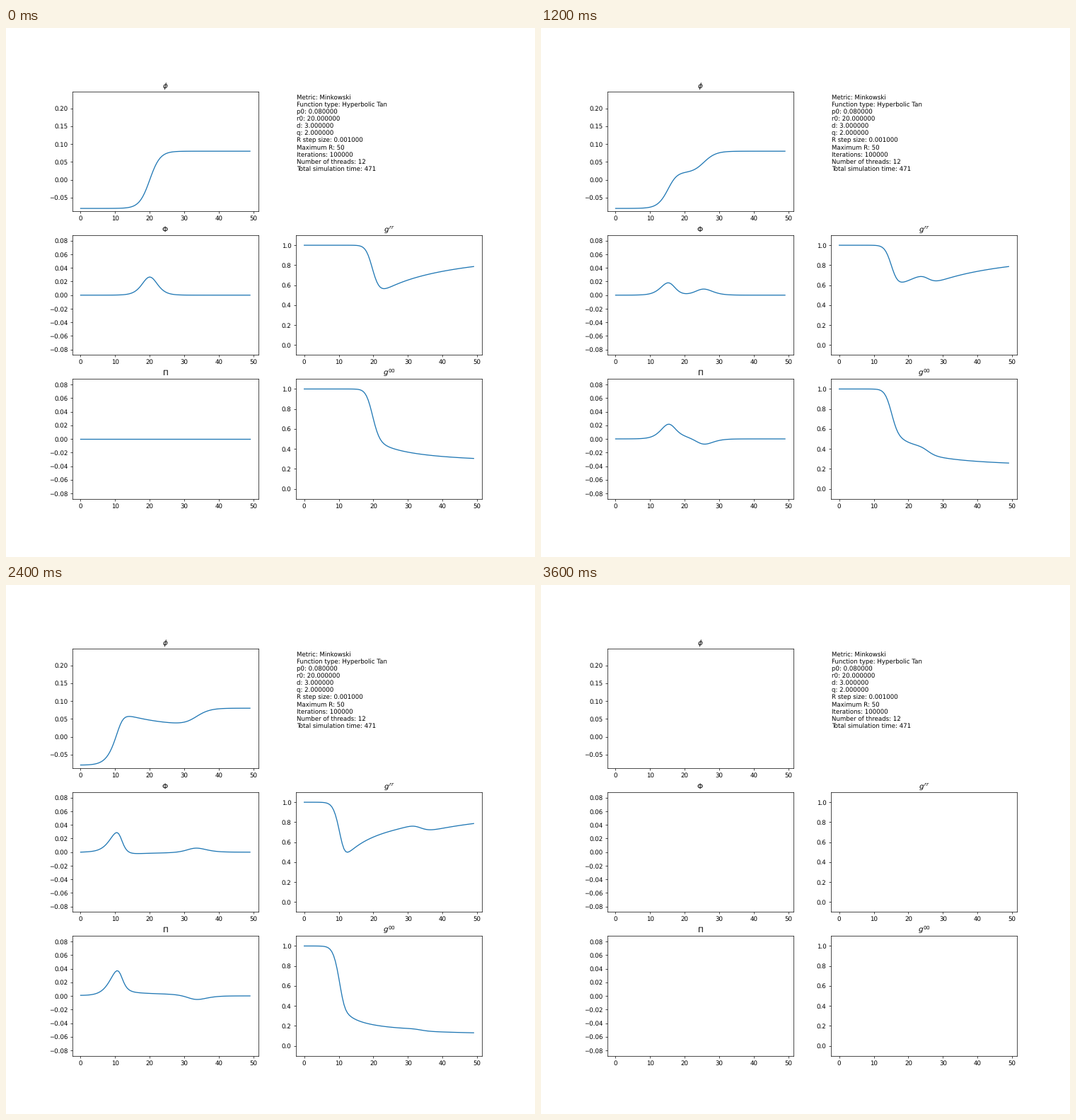
Recreate the animation shown at these times as a matplotlib script. Size 748 by 748 pixels, loop 5000 ms.

```python
import numpy as np
import matplotlib.pyplot as plt
from matplotlib.animation import FuncAnimation

# Collapse of a massless scalar field in polar-areal coordinates.
P0, R0, D = 0.08, 20.0, 3.0
DR, R_MAX = 0.025, 60.0
FRAME_TIME = 0.4        # coordinate time per frame
LIVE, FRAMES = 36, 50   # the run breaks down after LIVE frames
CFL, DAMP = 0.8, 0.08

r = np.arange(0, R_MAX + DR / 2, DR)
area = r[2:] ** 3 - r[:-2] ** 3
shown = slice(0, int(round(49 / DR)) + 1, int(round(0.5 / DR)))


def cumint(f):
    out = np.zeros_like(f)
    np.cumsum((f[1:] + f[:-1]) * (DR / 2), out=out[1:])
    return out


def metric(Phi, Pi):
    """Return 1/a^2 and the lapse, with unit lapse at the centre."""
    source = 2 * np.pi * r * (Phi ** 2 + Pi ** 2)
    factor = np.exp(cumint(2 * source))
    grr = np.ones_like(r)
    grr[1:] = (cumint(factor) / factor)[1:] / r[1:]
    slope = source.copy()
    slope[1:] += (1 / grr[1:] - 1) / (2 * r[1:])
    return grr, np.exp(cumint(slope))


def rates(state):
    phi, Phi, Pi = state
    grr, lapse = metric(Phi, Pi)
    speed = lapse * np.sqrt(grr)
    flow, flux = speed * Pi, speed * Phi
    out = np.zeros_like(state)
    out[0] = flow
    out[1, 1:-1] = (flow[2:] - flow[:-2]) / (2 * DR)
    moment = r ** 2 * flux
    out[2, 1:-1] = 3 * (moment[2:] - moment[:-2]) / area
    out[2, 0] = 3 * flux[1] / DR
    f = state[1:]
    out[1:, 2:-2] -= DAMP / (16 * DR) * (
        f[:, 4:] - 4 * f[:, 3:-1] + 6 * f[:, 2:-2] - 4 * f[:, 1:-3] + f[:, :-4])
    return out


def advance(state, span):
    while span > 1e-9:
        grr, lapse = metric(state[1], state[2])
        dt = min(span, CFL * DR / np.max(lapse * np.sqrt(grr)))
        k1 = rates(state)
        k2 = rates(state + dt / 2 * k1)
        k3 = rates(state + dt / 2 * k2)
        k4 = rates(state + dt * k3)
        state = state + dt / 6 * (k1 + 2 * k2 + 2 * k3 + k4)
        span -= dt
    return state


def simulate():
    s = (r - R0) / D
    state = np.array([P0 * np.tanh(s), P0 / D / np.cosh(s) ** 2, 0 * r])
    history = []
    for i in range(LIVE):
        if i:
            state = advance(state, FRAME_TIME)
        grr, lapse = metric(state[1], state[2])
        history.append([f[shown] for f in (*state, grr, lapse ** -2)])
    return history


history = simulate()

plt.rcParams["text.hinting"] = "none"
fig, axes = plt.subplots(3, 2, figsize=(12, 12), dpi=748 / 12)
axes[0, 1].axis("off")

panels = [
    (axes[0, 0], r"$\phi$", (-0.088, 0.247)),
    (axes[1, 0], r"$\Phi$", (-0.088, 0.088)),
    (axes[2, 0], r"$\Pi$", (-0.088, 0.088)),
    (axes[1, 1], r"$g^{rr}$", (-0.1, 1.1)),
    (axes[2, 1], r"$g^{00}$", (-0.1, 1.1)),
]
lines = []
for ax, title, ylim in panels:
    ax.set_title(title)
    ax.set_xlim(-2.45, 51.45)
    ax.set_ylim(*ylim)
    lines += ax.plot([], [], color="C0")

info = [
    "Metric: Minkowski",
    "Function type: Hyperbolic Tan",
    "p0: 0.080000",
    "r0: 20.000000",
    "d: 3.000000",
    "q: 2.000000",
    "R step size: 0.001000",
    "Maximum R: 50",
    "Iterations: 100000",
    "Number of threads: 12",
    "Total simulation time: 471",
]
for i, text in enumerate(reversed(info)):
    fig.text(0.55, 0.73 + i * 0.0135, text)


def update(i):
    for n, line in enumerate(lines):
        if i < LIVE:
            line.set_data(r[shown], history[i][n])
        else:
            line.set_data([], [])
    return lines


anim = FuncAnimation(fig, update, frames=FRAMES, interval=100, repeat=True,
                     repeat_delay=0)
plt.show()
```
